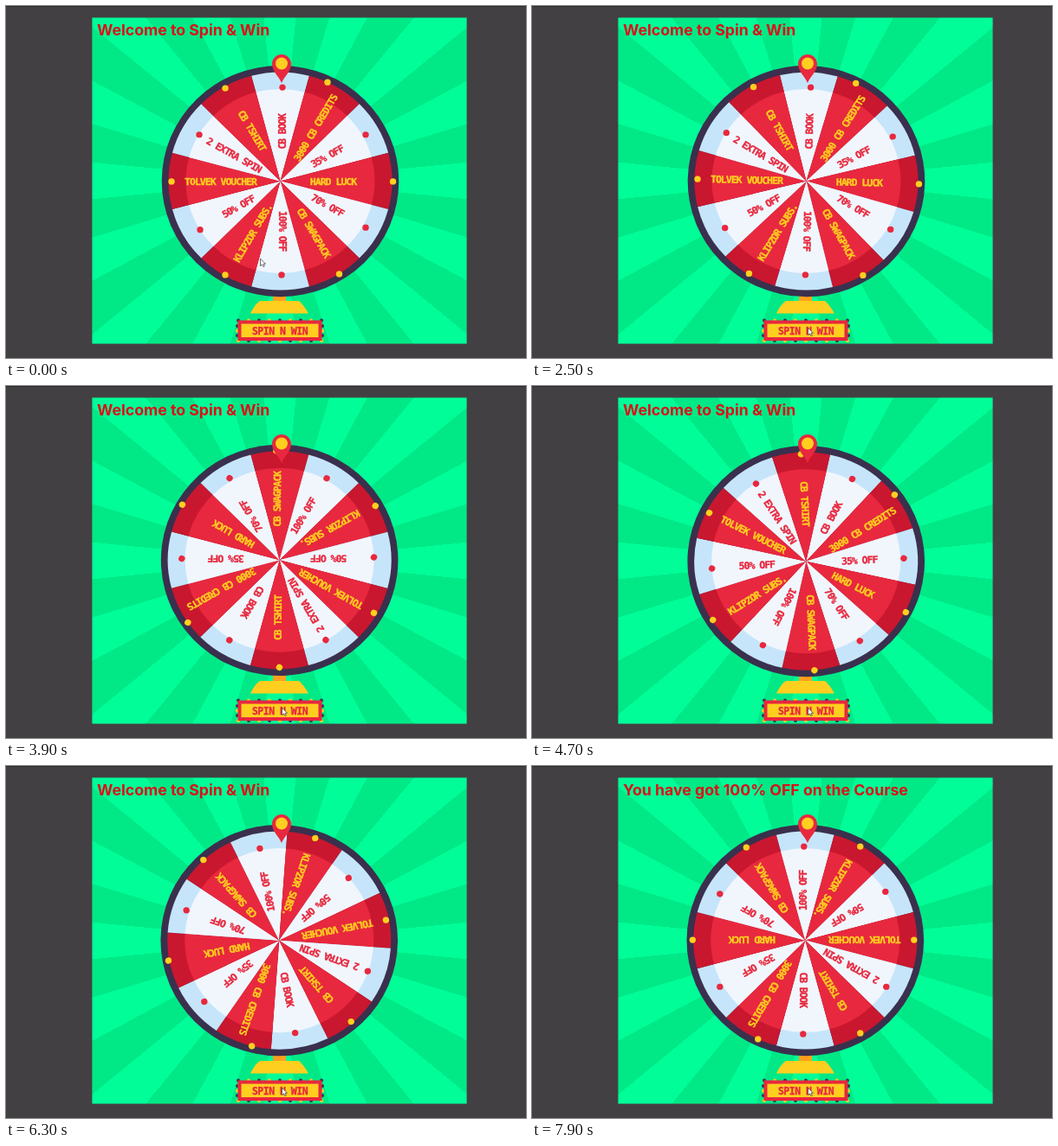
Animation, 600 px wide and 407 px high, one loop 8 s. Source, as an HTML page:

```html
<!DOCTYPE html>
<html lang="en">
<head>
<meta charset="utf-8">
<title>Spin &amp; Win</title>
<style>
  html, body { margin: 0; width: 100%; height: 100%; overflow: hidden; background: #434043; }
  svg { display: block; position: absolute; left: 0; top: 0; }
  #rays {
    position: absolute; left: 99px; top: 13px; width: 433px; height: 378px; clip-path: inset(.4px);
    background: repeating-conic-gradient(from 5.625deg at 217px 189px, #00e986 0 11.25deg, #00fd98 11.25deg 22.5deg);
  }
  #title { font: 700 17.7px Inter, "Open Sans", sans-serif; fill: #da1018; }
  .label {
    font: 700 11.5px "DejaVu Sans Mono", monospace; letter-spacing: -1px;
    text-anchor: middle; stroke-width: .35px;
  }
  #caption { letter-spacing: -.5px; }
</style>
</head>
<body>
<div id="rays"></div>
<svg width="600" height="407" viewBox="0 0 600 407">
  <path d="M0 .5H600" stroke="#2c2a2c"/>
  <text id="title" x="105" y="33.5"></text>

  <path d="M308 332h15v10h-15z" fill="#ff9f1c"/>
  <path d="M293 341h45q5 4 11 14.500h-67q5 -11 11 -14.500z" fill="#ffcf1f"/>

  <g id="wheel"></g>

  <path d="M318 89C315 81 307 76 307 67a11 11 0 0 1 22 0C329 76 321 81 318 89z" fill="#e8283e"/>
  <circle cx="318" cy="66.500" r="7" fill="#ffcf1f"/>

  <g id="bulbs"></g>
  <path d="M267.500 363.500h97v23.500h-97z" fill="#e8283e"/>
  <path d="M271.500 367.500h89v15.500h-89z" fill="#ffcf1f"/>
  <text id="caption" class="label" x="316" y="379.700" fill="#e8283e" stroke="#e8283e">SPIN N WIN</text>

  <path id="cursor" d="M0 0V8.500L2 6.800L3.400 9.500L4.800 8.800L3.500 6.200H6z" fill="#fff" stroke="#333" stroke-width=".7"/>
</svg>
<script>
const LOOP = 8000, STEP = 100;
const SPIN_START = 1414, SPIN_TIME = 6000, SPIN_ANGLE = 4 * 360 + 180;
const SQUASH = 0.977; // the whole view is slightly flattened
const RED = '#e8283e', YELLOW = '#ffcf1f';
const $ = id => document.getElementById(id);

function add(parent, tag, attrs, text = '') {
  const node = document.createElementNS('http://www.w3.org/2000/svg', tag);
  for (const key in attrs) node.setAttribute(key, attrs[key]);
  node.textContent = text;
  return parent.appendChild(node);
}

// Clockwise from the top: label, its centre, then its dot, relative to the hub
const prizes = [
  ['CB BOOK', 2, -58.5, 2.5, -111],
  ['3000 CB CREDITS', 40.5, -63, 54.5, -117],
  ['35% OFF', 54, -29.5, 98.5, -55],
  ['HARD LUCK', 61, 0, 130, 0.5],
  ['70% OFF', 54.5, 28.5, 98.5, 55],
  ['CB SWAGPACK', 38.5, 61, 68, 110],
  ['100% OFF', 2.5, 59, 1.5, 111],
  ['KLIPZOR SUBS.', -32, 61.5, -63.5, 111],
  ['50% OFF', -48.5, 30, -92.5, 57.5],
  ['TOLVEK VOUCHER', -69, 0, -125.5, 0.5],
  ['2 EXTRA SPIN', -53.5, -31, -93.5, -55],
  ['CB TSHIRT', -32.5, -60, -63.5, -110]
];

function sector(parent, index, radius, fill) {
  const point = a => [radius * Math.sin(a), -radius * Math.cos(a)];
  const mid = index * Math.PI / 6, half = Math.PI / 12;
  add(parent, 'path', {
    d: `M0 0L${point(mid - half)}A${radius} ${radius} 0 0 1 ${point(mid + half)}z`, fill
  });
}

function buildWheel() {
  const disc = add($('wheel'), 'g', { transform: 'translate(.6 .5)' });
  add(disc, 'circle', { r: 136.8, fill: '#3a304d' });
  prizes.forEach((_, i) => {
    sector(disc, i, 129, i % 2 ? '#c9172f' : '#c6e5fa');
    sector(disc, i, 109, i % 2 ? RED : '#f1f6fd');
  });
  prizes.forEach(([name, x, y, dotX, dotY], i) => {
    const tone = i % 2 ? YELLOW : RED;
    const turn = i * 30 + (i < 7 ? -90 : 90);
    add(disc, 'circle', { cx: dotX, cy: dotY, r: 3.7, fill: tone });
    add(disc, 'text', {
      class: 'label', y: 4.2, fill: tone, stroke: tone,
      transform: `translate(${x} ${y}) rotate(${turn})`
    }, name);
  });
}

function buildBulbs() {
  const tones = ['#3a304d', YELLOW];
  const bulb = (cx, cy, i) => add($('bulbs'), 'circle', { cx, cy, r: 2, fill: tones[i % 2] });
  for (let i = 0; i < 9; i++) {
    bulb(268 + i * 12, 363.5, i);
    bulb(268 + i * 12, 387, i + 1);
  }
  for (let i = 0; i < 3; i++) {
    bulb(267, 370 + i * 5.5, i);
    bulb(365, 370 + i * 5.5, i);
  }
}

const clamp = v => Math.min(1, Math.max(0, v));

function draw(t) {
  // The spin settles into its pace with a slight lag
  const elapsed = t - SPIN_START - 16 * clamp((t - 1700) / 800);
  const spin = clamp(elapsed / SPIN_TIME);
  const angle = SPIN_ANGLE * (1 - (1 - spin) ** 3);
  $('wheel').setAttribute('transform', `translate(315.9 202) scale(1 ${SQUASH}) rotate(${angle})`);

  const title = spin < 1 ? 'Welcome to Spin & Win' : 'You have got 100% OFF on the Course';
  if ($('title').textContent !== title) $('title').textContent = title;

  const p = clamp((t - 100) / 1000), move = p * p * (3 - 2 * p);
  $('cursor').setAttribute('transform', `translate(${293.5 + 25 * move} ${292 + 80 * move})`);
}

function tick() {
  draw(Math.floor(performance.now() % LOOP / STEP) * STEP);
  requestAnimationFrame(tick);
}

buildWheel();
buildBulbs();
tick();
</script>
</body>
</html>
```
